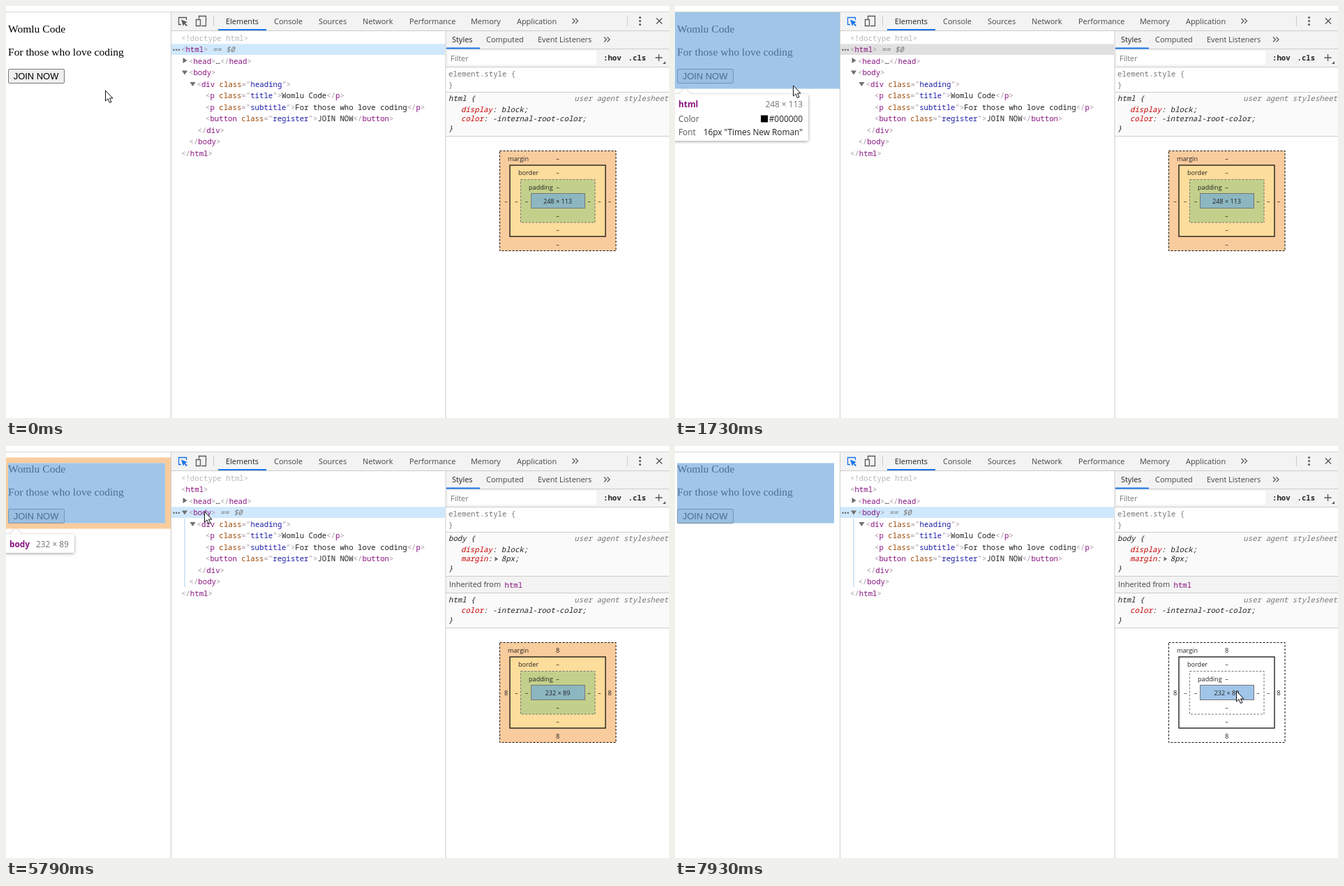
Animation, 950 px wide and 590 px high, one loop 7990 ms. Source, as an HTML page:

```html
<!DOCTYPE html>
<html lang="en">
<head>
<meta charset="utf-8">
<title>Inspector demo</title>
<style>
html, body { margin: 0; width: 100%; height: 100%; overflow: hidden; background: #fff; }
svg { display: block; }
text { white-space: pre; fill: #222; }
.ui { font: 10.95px "Open Sans", "Noto Sans", sans-serif; fill: #444; }
.tip { font: 11.85px "Open Sans", "Noto Sans", sans-serif; fill: #555; }
.dim { font: 9.1px "Open Sans", "Noto Sans", sans-serif; }
.mono { font: 10.7px "Noto Sans Mono", "DejaVu Sans Mono", monospace; }
.page { font: 15.55px "Liberation Serif", "Times New Roman", serif; fill: #000; }
.btn { font: 12.95px "Liberation Sans", Arial, sans-serif; fill: #000; }
.it { font-style: italic; }
.bold { font-weight: bold; }
.end { text-anchor: end; }
.mid { text-anchor: middle; }
.tag { fill: #881280; }
.mark { fill: #a894a6; }
.attr { fill: #994500; }
.val { fill: #1a1aa6; }
.prop { fill: #c80000; }
.dark { fill: #222; }
.grey { fill: #757575; }
.pale { fill: #b8b8b8; }
</style>
</head>
<body>
<svg id="stage" width="950" height="590" viewBox="0 0 950 590"></svg>
<script>
const LOOP = 7990;
const INSPECT_ON = 950;
const SELECT_BODY = 5790;
const BRAND = 'Womlu Code';
const SLOGAN = 'For those who love coding';

const START = [142, 121];
// Pointer moves: first step, last step, step count, end x, end y
const MOVES = [
  [580, 900, 6, 252, 19],
  [980, 1320, 6, 215, 66],
  [1390, 1730, 6, 169, 114],
  [2060, 2390, 6, 136, 145],
  [2530, 2590, 2, 189, 143],
  [2730, 2790, 2, 154, 143],
  [2930, 2990, 2, 173, 142],
  [3130, 3190, 2, 134, 145],
  [3330, 3390, 2, 168, 141],
  [3860, 3860, 1, 182, 141],
  [3930, 4460, 9, 284, 94],
  [6590, 6930, 6, 724, 307],
  [6990, 7330, 6, 790, 354],
  [7390, 7640, 4, 774, 357],
  [7710, 7930, 4, 804, 351]
];

// Page elements: content box, margin box, size label, row in the tree
const ELEMENTS = {
  html: { box: [0, 9, 236, 109.5], size: '248 × 113', row: 1 },
  body: { box: [3, 24.5, 225, 86], outer: [0, 16.5, 236, 102], size: '232 × 89', row: 3 },
  div: { box: [3, 24.5, 225, 86], size: '232 × 89', cls: 'heading', row: 4 },
  title: { box: [3, 24.5, 225, 17.5], outer: [3, 9, 225, 48.5], size: '232 × 18', tag: 'p', cls: 'title', row: 5 },
  subtitle: { box: [3, 57.5, 225, 17.5], outer: [3, 42, 225, 48.5], size: '232 × 18', tag: 'p', cls: 'subtitle', row: 6 },
  button: { box: [3, 90.5, 80, 20], size: '82.8 × 21', cls: 'register', row: 7 }
};
const ROW_OWNER = ['', 'html', '', 'body', 'div', 'title', 'subtitle', 'button', 'div', 'body', 'html'];

// Box model layers: name, x, y, width, height, nested fill, single fill, line
const LAYERS = [
  ['margin', 707.5, 207.5, 166.5, 143, '#f9cc9d', '#f9cc9d', 'stroke="#111" stroke-dasharray="3 2"'],
  ['border', 722, 228, 137, 102, '#fddd9b', '#fff', 'stroke="#111" stroke-width="1.3"'],
  ['padding', 737.5, 248.5, 106.5, 61.5, '#c3d08b', '#fff', 'stroke="#777" stroke-dasharray="3 2"'],
  ['content', 752.5, 268.5, 77, 21, '#8cb6c0', '#a0c5e8', 'stroke="#777"']
];
const BODY_SHIFT = 74;

const esc = s => s.replace(/&/g, '&amp;').replace(/</g, '&lt;');
const text = (x, y, cls, s) => `<text x="${x}" y="${y}" class="${cls}">${s}</text>`;
const span = (cls, s) => `<tspan class="${cls}">${esc(s)}</tspan>`;
const rect = (x, y, w, h, fill, more = '') =>
  `<rect x="${x}" y="${y}" width="${w}" height="${h}" fill="${fill}" ${more}/>`;
const path = (d, stroke, more = '') => `<path d="${d}" fill="none" stroke="${stroke}" ${more}/>`;
const shape = (d, fill) => `<path d="${d}" fill="${fill}"/>`;
const hline = (x, y, w, color = '#ccc') => rect(x, y, w, 1, color);
const chevrons = (x, y) => path(`M${x} ${y}l3.5 3.5l-3.5 3.5m4.5 -7l3.5 3.5l-3.5 3.5`, '#555', 'stroke-width="1.2"');
const triDown = (x, y) => shape(`M${x} ${y}h8l-4 6z`, '#6e6e6e');
const triRight = (x, y, s = 1) => shape(`M${x} ${y}l${6 * s} ${4 * s}l${-6 * s} ${4 * s}z`, '#6e6e6e');
const frame = ([x, y, w, h]) => `M${x} ${y}h${w}v${h}h${-w}z`;
const inside = (x, y, l, t, w, h) => x >= l && x < l + w && y >= t && y < t + h;

const pen = document.createElement('canvas').getContext('2d');
function tipWidth(s, weight = '') {
  pen.font = `${weight} 11.85px "Open Sans", "Noto Sans", sans-serif`;
  return pen.measureText(s).width;
}

const open = (tag, cls) => span('mark', '<') + span('tag', tag) +
  (cls ? ' ' + span('attr', 'class') + span('mark', '="') + span('val', cls) + span('mark', '"') : '') +
  span('mark', '>');
const close = tag => span('mark', '</') + span('tag', tag) + span('mark', '>');

const TREE = [
  [251, span('pale', '<!doctype html>')],
  [251, open('html')],
  [262, open('head') + '…' + close('head')],
  [262, open('body')],
  [273.5, open('div', 'heading')],
  [286, open('p', 'title') + BRAND + close('p')],
  [286, open('p', 'subtitle') + SLOGAN + close('p')],
  [286, open('button', 'register') + 'JOIN NOW' + close('button')],
  [274.5, close('div')],
  [262.5, close('body')],
  [251, close('html')]
];
const rowTop = i => 37.8 + 16.5 * i;

function pointerAt(t) {
  let [x, y] = START;
  for (const [from, to, n, endX, endY] of MOVES) {
    if (t < from) break;
    const k = n > 1 ? Math.min(n, 1 + Math.floor((t - from) / (to - from) * (n - 1) + 1e-6)) : 1;
    x += (endX - x) * k / n;
    y += (endY - y) * k / n;
  }
  return [x, y];
}

function pageHit(x, y) {
  if (y < 9) return '';
  for (const name of ['title', 'subtitle', 'button', 'div'])
    if (inside(x, y, ...ELEMENTS[name].box)) return name;
  return y > 24 && y < 110 ? 'div' : 'html';
}

function stateAt(t) {
  const [x, y] = pointerAt(t);
  const s = { x, y, inspect: t >= INSPECT_ON, sel: t >= SELECT_BODY ? 'body' : 'html', hover: '', row: -1, layer: '' };
  s.focus = !s.inspect || s.sel === 'body';
  if (x < 236) {
    if (s.inspect) s.hover = pageHit(x, y);
    if (s.hover) s.row = ELEMENTS[s.hover].row;
    s.full = true;
  } else if (x < 629) {
    const i = Math.floor((y - rowTop(0)) / 16.5);
    if (i >= 0 && i < TREE.length) {
      s.row = i;
      s.hover = ROW_OWNER[i];
    }
  } else if (s.sel === 'body') {
    for (const [name, l, top, w, h] of LAYERS) {
      const pad = name === 'border' ? 3 : 0;
      if (inside(x, y, l + pad, top + BODY_SHIFT + pad, w - 2 * pad, h - 2 * pad)) s.layer = name;
    }
  }
  return s;
}

function drawPage() {
  return hline(0, 8, 950, '#d5d5d5') +
    text(3, 38, 'page', BRAND) + text(3, 71, 'page', SLOGAN) +
    rect(3.5, 90.5, 80, 20, '#efefef', 'stroke="#767676" rx="1.5"') +
    text(43, 105, 'btn mid', 'JOIN NOW');
}

function drawHighlight(el, parts) {
  const { box, outer } = el;
  let out = '';
  if (outer && parts.includes('margin'))
    out += `<path d="${frame(outer)}${frame(box)}" fill="#f6b26b" fill-opacity=".66" fill-rule="evenodd"/>`;
  if (parts.includes('content')) out += rect(...box, '#6fa8dc', 'fill-opacity=".66"');
  return out;
}

function drawTip(name, full) {
  const el = ELEMENTS[name], tag = el.tag || name, cls = el.cls ? '.' + el.cls : '';
  const [, oy, , oh] = el.outer || el.box;
  const own = el.tag === 'p';
  const x = name === 'html' || name === 'body' ? -3 : 3, y = oy + oh + 8;
  const titleW = tipWidth(tag + cls, 'bold');
  const w = full ? 194 : 8 + titleW + 9 + tipWidth(el.size) + 8;
  const h = full ? (own ? 115 : 66.5) : 26.5;
  const left = x + 8, right = x + w - 8;
  const row = (dy, label, value) =>
    text(left, y + dy, 'tip', label) + text(right, y + dy, 'tip end dark', value);
  let out = `<g filter="url(#shadow)">` + rect(x, y, w, h, '#fff', 'rx="3"') +
    shape(`M${x + 9} ${y}l8 -8l8 8z`, '#fff') + '</g>' +
    text(left, y + 18.3, 'tip bold', span('tag', tag) + span('val', cls)) +
    text(right, y + 18.3, 'tip end grey', el.size);
  if (!full) return out;
  out += row(39.5, 'Color', '#000000') + rect(right - 60, y + 30, 10, 10, '#000') +
    row(58.3, 'Font', '16px "Times New Roman"');
  if (own) {
    out += row(76.7, 'Margin', '16px 0px') + hline(left, y + 86, w - 16, '#ddd') +
      text(left, y + 105.5, 'tip', 'Contrast') +
      rect(right - 57.5, y + 92.5, 19, 17, '#fff', 'stroke="#ddd" rx="1"') +
      text(right - 48, y + 105.2, 'tip mid dark', 'Aa') + text(right - 18, y + 105.5, 'tip end', '21') +
      path(`M${right - 12} ${y + 100}l4 4l7 -8`, '#2f7d32', 'stroke-width="1.7"');
  }
  return out;
}

function drawToolbar(inspect) {
  const ink = inspect ? '#1a73e8' : '#5a5a5a';
  const tabs = [[315, 'Elements'], [384, 'Console'], [448, 'Sources'], [511, 'Network'],
    [578, 'Performance'], [666, 'Memory'], [732, 'Application']];
  return rect(237, 9, 713, 26, '#f3f3f3') + hline(237, 35, 713) + rect(236, 9, 1, 581, '#ccc') +
    path('M251 26.5H247.5V16.5H258.5V20', ink, 'stroke-width="1.3"') +
    shape('M251 19.5L260 23L256.6 24.4L260 27.8L258.6 29L255.3 25.7L254 29z', ink) +
    path('M276.5 18.5V14.5H286.5V28.5H280M272.5 19.5H278.5V28.5H272.5Z', '#5a5a5a', 'stroke-width="1.3"') +
    rect(297, 14, 1, 15, '#ccc') + rect(890, 14, 1, 15, '#ccc') +
    tabs.map(([x, s], i) => text(x, 26, i ? 'ui' : 'ui dark', s)).join('') +
    rect(304, 33, 69, 2, '#1a73e8') + chevrons(811.5, 18) +
    [16.5, 21.5, 26.5].map(y => `<circle cx="908.5" cy="${y}" r="1.5" fill="#555"/>`).join('') +
    path('M932 17.5l8 8m0 -8l-8 8', '#555', 'stroke-width="1.4"');
}

function drawTree(s) {
  const sel = ELEMENTS[s.sel].row;
  let out = rect(237, rowTop(sel), 392, 15.7, s.focus ? '#cfe8fc' : '#e0e0e0');
  if (s.row >= 0 && s.row !== sel)
    out += rect(240, rowTop(s.row) - .3, 387, 16, '#ebf2fc', 'rx="3"');
  if (s.sel === 'body') out += rect(255.5, 104, 1, 98, '#a9cdf0');
  const dotY = rowTop(sel) + 8.5;
  out += [240.5, 244.2, 247.9].map(x => `<circle cx="${x}" cy="${dotY}" r="1.2" fill="#666"/>`).join('');
  TREE.forEach(([x, code], i) => {
    const mark = i === sel ? `<tspan class="it grey"> == $0</tspan>` : '';
    out += text(x, rowTop(i) + 11.8, 'mono', code + mark);
  });
  return out + triRight(253.5, 74) + triDown(252, 92.5) + triDown(263.5, 109);
}

function drawStyles(sel) {
  const rule = (y, name) => text(634, y, 'mono it', name + ' {') +
    text(949, y, 'mono it end grey', 'user agent stylesheet');
  const prop = (y, name, value) => text(652, y, 'mono it', span('prop', name) + ': ' + value);
  const brace = y => text(634, y, 'mono it', '}');
  const tabs = [[639, 'Styles'], [688, 'Computed'], [762, 'Event Listeners']];
  let out = rect(630, 36, 320, 51, '#f3f3f3') + hline(630, 61, 320) + rect(631, 59.5, 48, 2, '#1a73e8') +
    tabs.map(([x, s], i) => text(x, 52, i ? 'ui' : 'ui dark', s)).join('') + chevrons(857, 44.5) +
    rect(633, 64, 213, 20, '#fff') + text(637, 78.5, 'ui grey', 'Filter') + hline(630, 87, 320) +
    text(856, 78, 'mono bold', ':hov') + text(891.5, 78, 'mono bold', '.cls') +
    path('M930.5 74h10m-5 -5v10', '#555', 'stroke-width="1.3"') + shape('M945 79v4h-4z', '#555') +
    text(634, 100.5, 'mono grey', 'element.style {') + text(634, 116.5, 'mono grey', '}') +
    rect(630, 123, 320, 63, '#fafafa') + hline(630, 123, 320) +
    rule(136, sel) + prop(151.5, 'display', 'block;') + brace(179) + hline(630, 186, 320);
  if (sel === 'html') {
    out += prop(165, 'color', '-internal-root-color;');
  } else {
    out += text(652, 165, 'mono it', span('prop', 'margin') + ':') + triRight(700.5, 158.5, .8) +
      text(709.8, 165, 'mono it', '8px;') +
      rect(630, 187, 320, 23, '#f3f3f3') + text(635, 202.3, 'ui', 'Inherited from') +
      text(714.5, 202.5, 'mono tag', 'html') +
      rect(630, 210, 320, 50, '#fafafa') + hline(630, 210, 320) +
      rule(223.5, 'html') + prop(239, 'color', '-internal-root-color;') + brace(253) + hline(630, 260, 320);
  }
  return out + rect(629.5, 36, 1, 554, '#ccc');
}

function drawBoxModel(sel, layer) {
  let out = '';
  LAYERS.forEach(([name, x, y, w, h, nested, single, line], i) => {
    const fill = !layer ? nested : layer === name ? single : '#fff';
    out += rect(x, y, w, h, fill, line);
    if (name === 'content') return;
    const value = sel === 'body' && name === 'margin' ? '8' : '–';
    const side = 14.7 * i;
    out += text(719 + 15 * i, 221.5 + 20.5 * i, 'dim', name) +
      [[790.5, 221.5 + 20.5 * i], [790.5, 344.5 - 20.5 * i], [716.5 + side, 283], [865 - side, 283]]
        .map(([tx, ty]) => text(tx, ty, 'dim mid', value)).join('');
  });
  out += text(790.5, 283, 'dim mid', ELEMENTS[sel].size);
  return `<g transform="translate(0 ${sel === 'body' ? BODY_SHIFT : 0})">${out}</g>`;
}

const drawPointer = (x, y) =>
  `<path transform="translate(${x + .5} ${y})" fill="#fff" stroke="#111" stroke-linejoin="round"
    d="M0 0V15L3.5 11.8L6 17.5L8.5 16.4L6 11H10.5Z"/>`;

const DEFS = `<defs><filter id="shadow" x="-20%" y="-20%" width="140%" height="150%">
  <feDropShadow dx="0" dy="1" stdDeviation="2" flood-color="#000" flood-opacity=".4"/></filter>
  <clipPath id="view"><rect x="0" y="9" width="236" height="581"/></clipPath></defs>`;

function render(s) {
  let overlay = '';
  if (s.hover) overlay = drawHighlight(ELEMENTS[s.hover], ['margin', 'content']) + drawTip(s.hover, s.full);
  else if (s.layer) overlay = drawHighlight(ELEMENTS.body, [s.layer]);
  return DEFS + rect(0, 0, 950, 590, '#fff') + drawPage() + `<g clip-path="url(#view)">${overlay}</g>` +
    drawToolbar(s.inspect) + drawTree(s) + drawStyles(s.sel) + drawBoxModel(s.sel, s.layer) +
    drawPointer(s.x, s.y);
}

const stage = document.getElementById('stage');
const began = performance.now();
let last = '';
function tick() {
  const state = stateAt((performance.now() - began) % LOOP);
  const key = JSON.stringify(state);
  if (key !== last) {
    stage.innerHTML = render(state);
    last = key;
  }
  requestAnimationFrame(tick);
}
tick();
</script>
</body>
</html>
```
